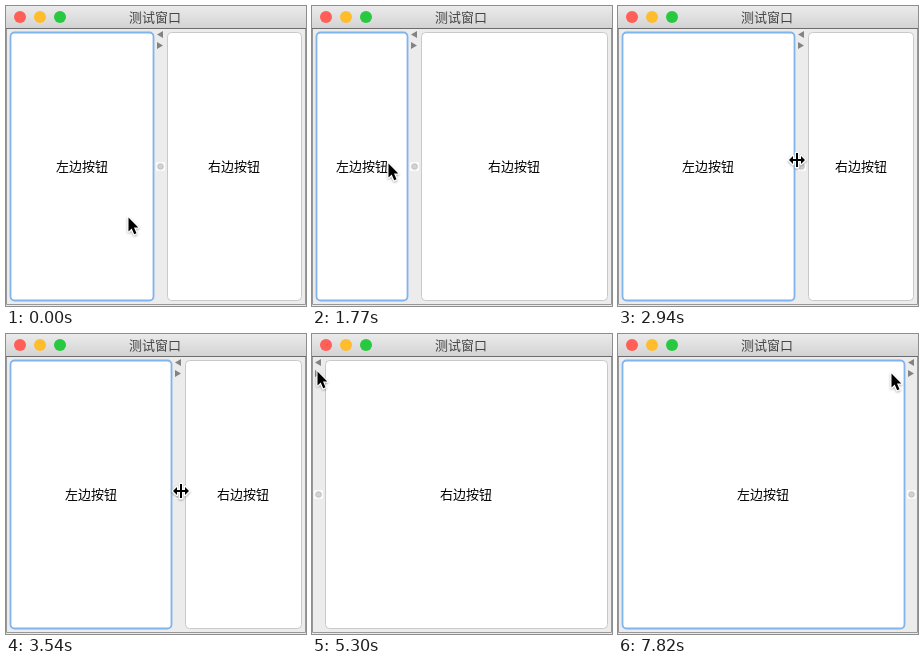
An HTML page for the animation above (8 s loop, 300 px wide and 300 px high).

```html
<!DOCTYPE html>
<html lang="zh-CN">
<head>
<meta charset="utf-8">
<style>
  html, body { margin: 0; width: 100%; height: 100%; overflow: hidden; background: #ececec; }
  svg { display: block; width: 100vw; height: 100vh; }
  text { font: 13px "Noto Sans CJK SC", "Noto Sans CJK", sans-serif; text-anchor: middle; }
</style>
</head>
<body>
<svg viewBox="0 0 300 300">
  <defs>
    <linearGradient id="bar" x2="0" y2="1">
      <stop stop-color="#ebebeb"/>
      <stop offset="1" stop-color="#d3d3d3"/>
    </linearGradient>
    <filter id="shadow" x="-50%" y="-50%" width="200%" height="200%">
      <feDropShadow dx="0" dy="1" stdDeviation="1" flood-opacity=".4"/>
    </filter>
  </defs>
  <rect width="300" height="300" fill="#ececec"/>
  <rect width="300" height="22" fill="url(#bar)"/>
  <path d="M0 22.5H300" stroke="#6c6c6c"/>
  <path d="M.5 23V298.5H299.5V23" fill="none" stroke="#989898"/>
  <circle cx="14" cy="11" r="6" fill="#ff5f57"/>
  <circle cx="34" cy="11" r="6" fill="#ffbd2e"/>
  <circle cx="54" cy="11" r="6" fill="#28c940"/>
  <text x="149" y="16" fill="#444">测试窗口</text>

  <g id="left">
    <rect y="26.5" height="268" rx="4" fill="#fff" stroke="#80b4ec" stroke-width="1.8"/>
    <text y="165">左边按钮</text>
  </g>
  <g id="right">
    <rect y="26.5" height="268" rx="4" fill="#fff" stroke="#c9c9c9"/>
    <text y="165">右边按钮</text>
  </g>
  <g id="divider">
    <path d="M-3 28.5L3 25V32ZM3 39.5L-3 36V43Z" fill="#838383"/>
    <rect x="-4" y="156" width="9" height="9" rx="1" fill="#fafafa"/>
    <circle cx=".5" cy="160.5" r="2.8" fill="#d2d2d2" stroke="#b8b8b8" stroke-width=".8"/>
  </g>
  <g id="cursor" stroke="#fff" stroke-linejoin="round" paint-order="stroke" filter="url(#shadow)">
    <path id="arrow" stroke-width="2" d="M.5 .5V14.5L3.7 11.5L6.2 17.3L8.5 16.3L6 10.6H10.3Z"/>
    <path id="resize" stroke-width="2.4" d="M-8 0L-4-4V-1H-1V-7H1V-1H4V-4L8 0L4 4V1H1V7H-1V1H-4V4Z"/>
  </g>
</svg>
<script>
  const LOOP = 8000, STEP = 147.5, MIN = 102, MAX = 197;
  const GRAB = 8, RELEASE = 26, HIDE_LEFT = 33, RESTORE = 41, HIDE_RIGHT = 51;

  // Where the pointer turns or rests: step, x, y
  const stops = [
    [1, 122, 211], [7, 154, 163], [GRAB, 154, 163],
    [12, 76, 157], [16.4, 277, 147], [22, 140, 157], [RELEASE, 210, 157],
    [32, 195, 28], [HIDE_LEFT, 195, 28], [36, 5, 37], [RESTORE, 8, 39],
    [45, 196, 54], [49, 195, 39], [HIDE_RIGHT, 196, 39], [53, 273, 39]
  ];

  const $ = id => document.getElementById(id);
  const clamp = (v, lo, hi) => Math.max(lo, Math.min(hi, v));
  const ease = k => (1 - Math.cos(Math.PI * clamp(k, 0, 1))) / 2;
  const place = (el, x, y) => el.setAttribute("transform", `translate(${x} ${y})`);
  const show = (el, on) => el.setAttribute("visibility", on ? "visible" : "hidden");

  function pointer(step) {
    const next = stops.findIndex(s => s[0] >= step);
    const i = next < 0 ? stops.length - 1 : Math.max(1, next);
    const [s0, x0, y0] = stops[i - 1], [s1, x1, y1] = stops[i];
    const k = ease((step - s0) / (s1 - s0));
    return [x0 + (x1 - x0) * k, y0 + (y1 - y0) * k].map(Math.round);
  }

  function dividerAt(step) {
    if (step >= HIDE_RIGHT) return 293;
    if (step >= HIDE_LEFT && step < RESTORE) return 6;
    if (step >= RELEASE) return MAX;
    if (step <= GRAB) return 154;
    return clamp(pointer(step - 0.11)[0], MIN, MAX); // the divider trails the drag slightly
  }

  function setButton(id, x, width, center) {
    const rect = $(id).querySelector("rect");
    rect.setAttribute("x", x);
    rect.setAttribute("width", Math.max(0, width));
    $(id).querySelector("text").setAttribute("x", center);
    show($(id), width > 0);
  }

  function render(t) {
    const step = Math.floor((t + 10) / STEP);
    const [x, y] = pointer(step), d = dividerAt(step);
    setButton("left", 4.5, d - 11, Math.floor(d / 2 - 1));
    setButton("right", d + 7.5, 288 - d, Math.ceil(d / 2 + 151));
    place($("divider"), d, 0);
    place($("cursor"), x, y);
    const resizing = Math.abs(x - d) < 8 && y > 44;
    show($("resize"), resizing);
    show($("arrow"), !resizing);
  }

  function tick() {
    render(performance.now() % LOOP);
    requestAnimationFrame(tick);
  }
  tick();
</script>
</body>
</html>
```
